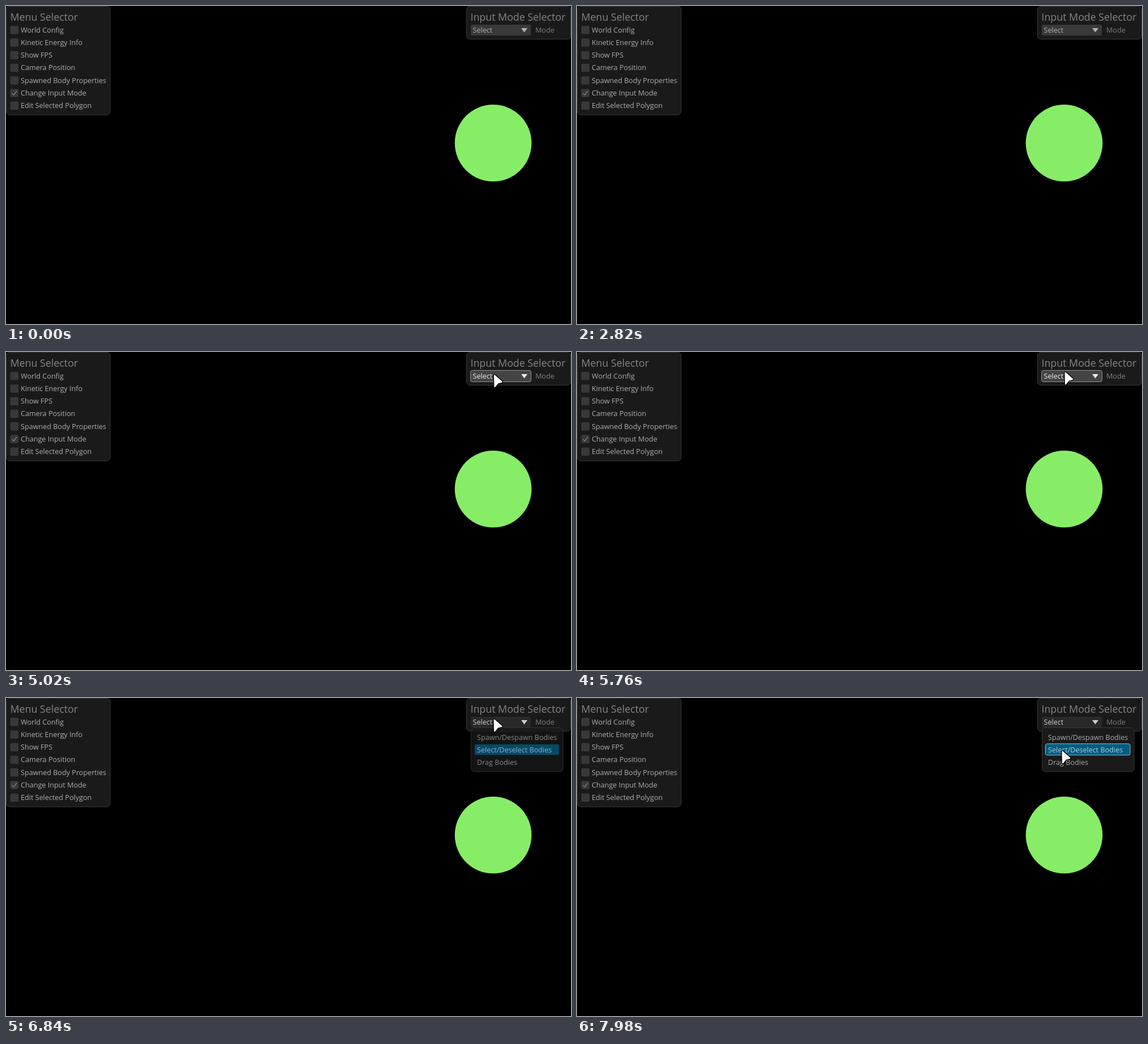
An HTML page with a canvas that plays this animation: 998 by 561 pixels, repeating every 8 s.

```html
<!DOCTYPE html>
<html lang="en">
<head>
<meta charset="utf-8">
<title>Input mode selector</title>
<style>
html, body { margin: 0; width: 100%; height: 100%; overflow: hidden; background: #000; }
canvas { display: block; }
</style>
</head>
<body>
<canvas id="stage" width="998" height="561"></canvas>
<script>
const ctx = document.getElementById('stage').getContext('2d');
const LOOP = 8000, POINTER_IN = 2860, MENU_OPEN = 6720, MENU_FADE = 155;
const FONT = '"Open Sans", "Noto Sans", sans-serif';
const MENU = ['World Config', 'Kinetic Energy Info', 'Show FPS', 'Camera Position',
  'Spawned Body Properties', 'Change Input Mode', 'Edit Selected Polygon'];
const MODES = ['Spawn/Despawn Bodies', 'Select/Deselect Bodies', 'Drag Bodies'];
const CHECKED = 5, SELECTED = 1, PITCH = 22.25;

// Pointer path: time, x, y
const PATH = [
  [2860, 975, 311], [3060, 885, 225], [3220, 842, 177], [3340, 848, 187],
  [3660, 848, 187], [3860, 857, 128], [4040, 864, 82], [4260, 868, 69], [4460, 864, 63],
  [4700, 862, 50], [5200, 861, 34], [5300, 861, 34], [5760, 861, 35], [5900, 861, 36],
  [6160, 861, 36], [6460, 861, 37], [7080, 861, 37], [7440, 861, 60],
  [7540, 861, 60], [7760, 859, 84], [7980, 856, 93]
];

function pointerAt(t) {
  if (t < POINTER_IN) return null;
  const i = PATH.findIndex(p => p[0] > t);
  if (i < 0) return PATH[PATH.length - 1].slice(1);
  const [t0, x0, y0] = PATH[i - 1], [t1, x1, y1] = PATH[i];
  const k = (t - t0) / (t1 - t0);
  return [x0 + (x1 - x0) * k, y0 + (y1 - y0) * k];
}

function box(x, y, w, h, r, fill, stroke) {
  ctx.beginPath();
  ctx.roundRect(x, y, w, h, r);
  ctx.fillStyle = fill;
  ctx.fill();
  if (!stroke) return;
  ctx.strokeStyle = stroke;
  ctx.lineWidth = 1;
  ctx.stroke();
}

function text(str, x, y, color, size = 12.6) {
  ctx.font = `${size}px ${FONT}`;
  ctx.fillStyle = color;
  ctx.fillText(str, x, y + size * 0.37);
}

function trace(points) {
  ctx.beginPath();
  points.forEach(([x, y]) => ctx.lineTo(x, y));
}

const panel = (x, y, w, h) => box(x, y, w, h, 6, '#1a1a1a', '#383838');
const heading = (str, x) => text(str, x, 19, '#858585', 17.8);

function drawMenu() {
  panel(0.5, 0.5, 183.5, 191.5);
  heading('Menu Selector', 7.5);
  MENU.forEach((label, i) => {
    const y = 42 + i * PITCH;
    box(7.5, y - 7, 14.5, 14.5, 2, '#383838');
    text(label, 26, y, '#acacac');
    if (i !== CHECKED) return;
    trace([[10.5, y + 0.5], [13.5, y + 4], [19, y - 3.5]]);
    ctx.strokeStyle = '#b0b0b0';
    ctx.lineWidth = 1;
    ctx.stroke();
  });
}

function drawSelector(open, hover) {
  panel(813.5, 0.5, 184, 58);
  heading('Input Mode Selector', 820.5);
  const color = hover ? '#ececec' : open ? '#cfcfcf' : '#b0b0b0';
  if (hover) box(820.5, 32.5, 107, 20, 3, '#444', '#949494');
  else box(821, 33, 106, 19, 2, open ? '#292929' : '#393939');
  text('Select', 824.5, 42, color);
  trace([[910, 39], [921, 39], [915.5, 46.5]]);
  ctx.fillStyle = color;
  ctx.fill();
  text('Mode', 935, 42, '#7d7d7d');
}

function drawPopup(alpha, pointerY) {
  ctx.globalAlpha = alpha;
  panel(821.5, 52.5, 162.5, 77.5);
  MODES.forEach((label, i) => {
    const y = 69 + i * PITCH, chosen = i === SELECTED;
    const hover = Math.abs(pointerY - y) < 11;
    const fill = chosen ? '#005c80' : '#444';
    if (hover) box(827.5, y - 10.5, 149.5, 20, 3, fill, chosen ? '#9cb8cc' : '#949494');
    else if (chosen) box(828, y - 9.5, 148.5, 18.5, 2, fill);
    text(label, 832, y, chosen ? '#b0cbe0' : hover ? '#e0e0e0' : '#a8a8a8');
  });
  ctx.globalAlpha = 1;
}

function drawPointer([x, y]) {
  ctx.save();
  ctx.translate(x, y);
  trace([[1.5, 1.5], [14.5, 13], [7.5, 14.8], [2, 21.5]]);
  ctx.closePath();
  ctx.lineJoin = 'round';
  for (const [color, width] of [['#000', 4.5], ['#fff', 2]]) {
    ctx.strokeStyle = color;
    ctx.lineWidth = width;
    ctx.stroke();
  }
  ctx.fillStyle = '#fff';
  ctx.fill();
  ctx.restore();
}

function draw(now) {
  const t = now % LOOP, pointer = pointerAt(t), open = t >= MENU_OPEN;
  ctx.fillStyle = '#000';
  ctx.fillRect(0, 0, 998, 561);

  ctx.beginPath();
  ctx.arc(860.5, 241.8, 67.8, 0, Math.PI * 2);
  ctx.fillStyle = '#87ed67';
  ctx.fill();

  drawMenu();
  drawSelector(open, !open && pointer && pointer[1] < 53);
  if (open) drawPopup(Math.min(1, (t - MENU_OPEN) / MENU_FADE), pointer[1]);
  if (pointer) drawPointer(pointer);
  requestAnimationFrame(() => draw(performance.now()));
}
draw(0);
</script>
</body>
</html>
```
